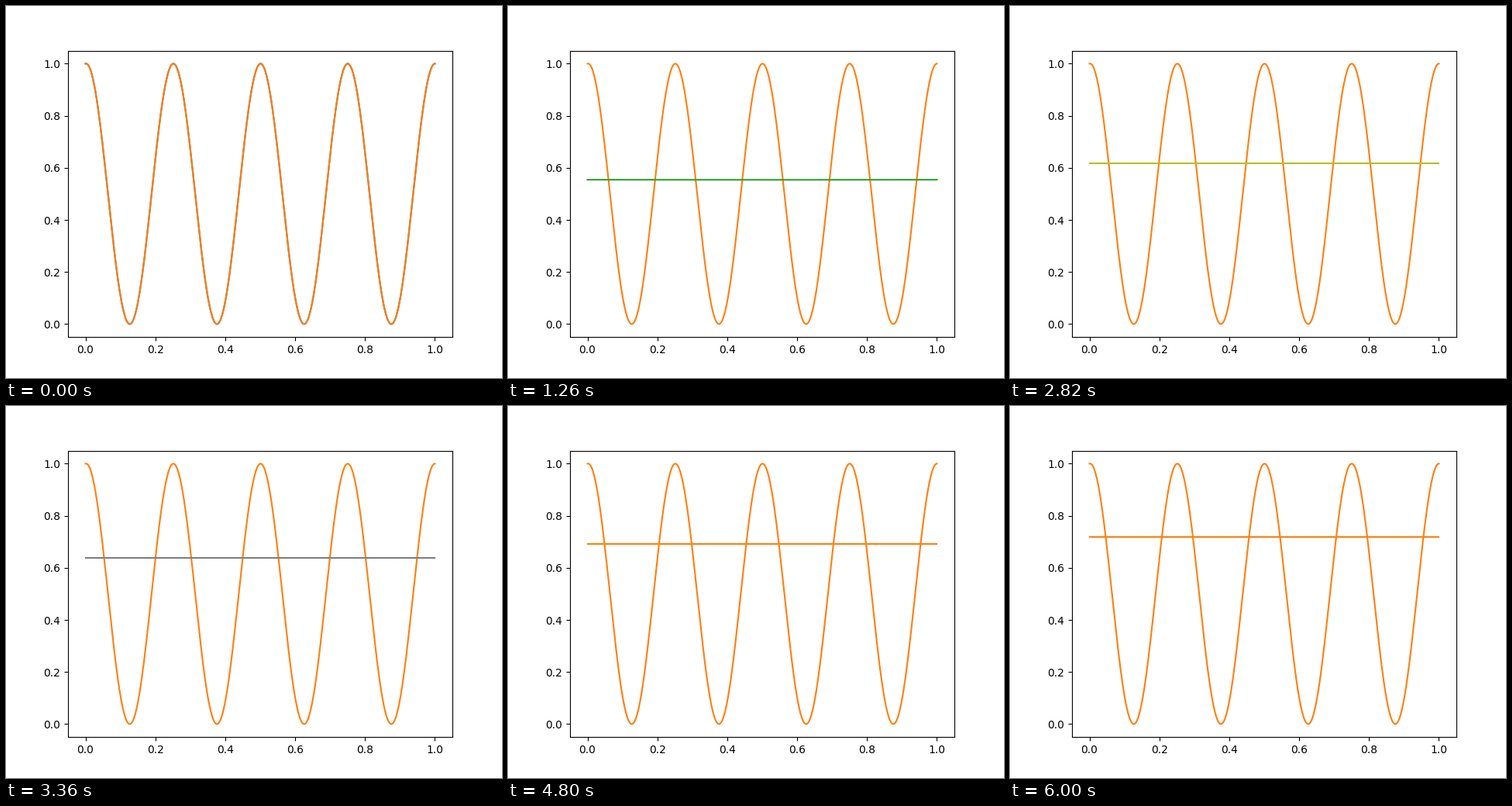
Recreate the animation shown at these times as a matplotlib script. Size 640 px wide and 480 px high, loop 6.06 s.

```python
import numpy as np
import matplotlib.pyplot as plt
from matplotlib.animation import FuncAnimation

POINTS = 500
FRAMES = 101
INTERVAL = 60       # ms
DIFFUSION = 0.0035  # per frame
GROWTH = 0.01       # per frame
LAST_STEP = 93      # the state is held from here on
SUBSTEPS = 10


def start_profile():
    """Four cosine-squared waves, with the first cell repeated at the edge."""
    wave = np.cos(4 * np.pi * np.linspace(0, 1, POINTS - 1)) ** 2
    return np.concatenate(([1.0], wave))


def solve(u):
    """Diffusion with logistic growth on a periodic line, one state per frame."""
    dt = 1 / SUBSTEPS
    modes = np.arange(POINTS // 2 + 1)
    damping = np.exp(-DIFFUSION * dt * (2 * np.pi * modes) ** 2)
    gain = np.exp(GROWTH * dt)
    states = [u]
    for step in range(1, FRAMES):
        if step <= LAST_STEP:
            for _ in range(SUBSTEPS):
                u = np.fft.irfft(np.fft.rfft(u) * damping, POINTS)
                u = u * gain / (1 + u * (gain - 1))
        states.append(u)
    return states


x = np.linspace(0, 1, POINTS)
states = solve(start_profile())

fig, ax = plt.subplots(figsize=(6.4, 4.8), dpi=100)
ax.plot(x, states[0], color="C1", zorder=2)
line, = ax.plot(x, states[0], color="C0", zorder=1.9)
ax.set_xlim(-0.05, 1.05)
ax.set_ylim(-0.05, 1.05)


def draw(frame):
    line.set_ydata(states[frame])
    # The fixed curve takes the second colour of the cycle.
    line.set_color(f"C{(frame + 1) % 10}" if frame else "C0")
    line.set_zorder(2.1 if frame else 1.9)
    return line,


def reset():
    return draw(0)


anim = FuncAnimation(fig, draw, frames=FRAMES, init_func=reset,
                     interval=INTERVAL, repeat=True, repeat_delay=0)
plt.show()
```
